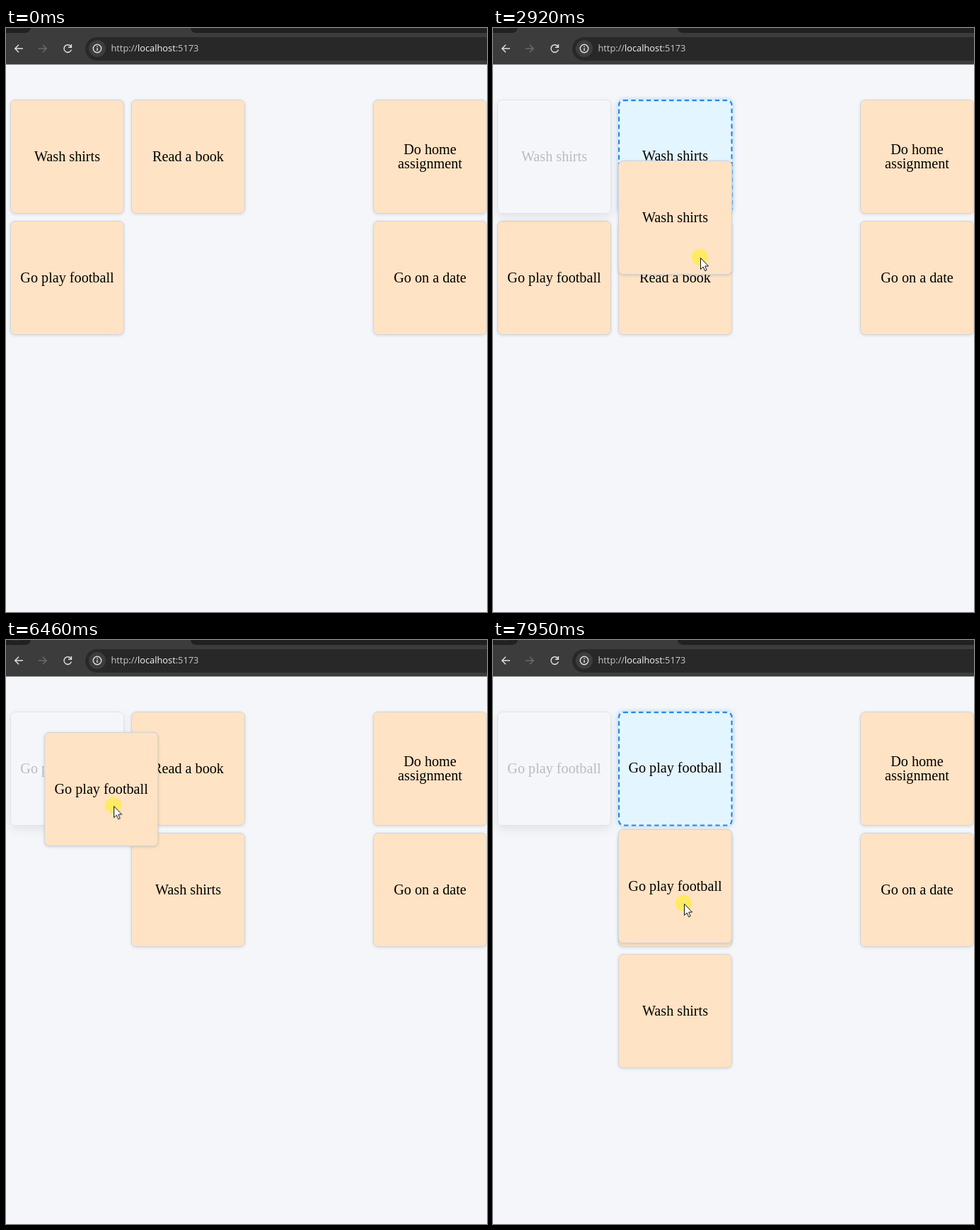
Recreate the animation shown at these times as an HTML page. Size 680 by 824 pixels, loop 8000 ms.

```html
<!DOCTYPE html>
<html lang="en">
<head>
<meta charset="utf-8">
<title>Task board</title>
<style>
  html, body { margin: 0; width: 100%; height: 100%; overflow: hidden; }
  body { position: relative; background: #f4f6fa; }
  body * { box-sizing: border-box; }

  /* Browser bar */
  .bar { position: absolute; left: 0; top: 0; width: 680px; height: 53px; }
  .url { font: 12.8px "Open Sans", "Noto Sans", sans-serif; fill: #c9c9c9; }
  .url .host { fill: #f4f4f4; }

  /* Cards */
  .card {
    position: absolute; left: 6px; top: 101px; width: 161px; height: 161px;
    display: flex; align-items: center; justify-content: center;
    padding-bottom: 2px;
    border: 1px solid #d3d6d9; border-radius: 7px;
    background: #ffe3c4; color: #000;
    box-shadow: 0 1px 4px rgba(0, 0, 0, .12);
    font: 20.2px/20px "Liberation Serif", "Times New Roman", serif;
    text-align: center; white-space: nowrap;
  }
  .col2 { left: 177px; }
  .col4 { left: 519px; }
  .row2 { top: 272px; }
  .ghost {
    background: transparent; color: #b9bcc0; border-color: #dfe2e7;
    box-shadow: 0 5px 14px rgba(0, 0, 0, .08);
  }
  /* Drawn at 150 px and enlarged, which also sets the dash length */
  .slot {
    left: 177px; width: 150.5px; height: 150.5px; font-size: 18.88px;
    scale: 1.07; transform-origin: 0 0;
    border: 2px dashed #2389e6; background: #e3f5ff;
    box-shadow: 0 0 6px rgba(35, 137, 230, .38);
  }
  .drag {
    left: 0; top: 0; border-color: #ced4da;
    box-shadow: 0 1px 4px rgba(0, 0, 0, .15);
  }

  /* Motion: one 8 s loop, hard changes by default */
  .card, .move, .cursor, .cursor * { animation: 8s step-end infinite; }
  .wash { animation-name: wash; }
  .football { animation-name: football; }
  .book { animation-name: book; }
  .first { animation-name: first; }
  .second { animation-name: second; }
  .first .slot { animation-name: slot1; }
  .second .slot { animation-name: slot2; }
  .first .drag { animation-name: drag1; animation-timing-function: linear; }
  .second .drag { animation-name: drag2; animation-timing-function: linear; }
  .cursor { animation-name: path; animation-timing-function: linear; }
  .arrow { animation-name: arrow; }
  .hand { animation-name: hand; }
  .halo { animation-name: halo; }

  /* Cards leave the stage while their ghost stands in */
  @keyframes wash {
    0% { translate: 0 0; }
    21.3% { translate: -400px 0; }
    61.65% { translate: 171px 171px; }
    84.1%, 100% { translate: 171px 342px; }
  }
  @keyframes football {
    0% { translate: 0 0; }
    61.65% { translate: 0 -171px; }
    77.5%, 100% { translate: -400px 0; }
  }
  @keyframes book {
    0% { translate: 0 0; }
    35.55% { translate: 0 171px; }
    43.55% { translate: 0 0; }
    84.1%, 100% { translate: 0 171px; }
  }
  @keyframes first {
    0% { visibility: hidden; }
    21.3% { visibility: visible; }
    61.65%, 100% { visibility: hidden; }
  }
  @keyframes second {
    0% { visibility: hidden; }
    77.5%, 100% { visibility: visible; }
  }
  @keyframes slot1 {
    0% { opacity: 0; translate: 0 171px; }
    28.8% { opacity: 1; translate: 0 171px; }
    35.55% { opacity: 1; translate: 0 0; }
    43.55%, 100% { opacity: 1; translate: 0 171px; }
  }
  @keyframes slot2 {
    0% { opacity: 0; }
    84.1%, 100% { opacity: 1; }
  }
  @keyframes drag1 {
    0%, 21.3% { translate: 8px 102px; }
    28% { translate: 93px 134px; }
    31.125% { translate: 177px 191px; }
    31.75% { translate: 177px 188px; }
    35.6%, 41.9% { translate: 177px 187px; }
    45.375%, 47.75% { translate: 186px 229px; }
    50.75%, 100% { translate: 184px 270px; }
  }
  @keyframes drag2 {
    0%, 77.5% { translate: 7px 102px; }
    80.75% { translate: 54px 130px; }
    87.25% { translate: 135px 161px; }
    88.125%, 91.25% { translate: 151px 169px; }
    92.1% { translate: 154px 172px; }
    99.375%, 100% { translate: 177px 267px; }
  }
  @keyframes path {
    0%, 1.3% { translate: 633px 796px; animation-timing-function: ease-out; }
    11.1% { translate: 158px 271px; }
    15% { translate: 118px 227px; }
    16.875%, 21.3% { translate: 129px 242px; }
    28% { translate: 216px 275px; }
    31.125% { translate: 293px 328px; }
    31.75% { translate: 293px 325px; }
    35.6%, 41.9% { translate: 293px 324px; }
    45.375%, 47.75% { translate: 309px 369px; }
    50.75%, 61.6% { translate: 307px 411px; }
    61.65%, 69.7% { translate: 305px 410px; }
    73.6% { translate: 100px 202px; }
    74.5%, 77.5% { translate: 104px 205px; }
    80.75% { translate: 152px 234px; }
    87.25% { translate: 231px 267px; }
    88.125%, 91.25% { translate: 246px 275px; }
    92.1% { translate: 249px 278px; }
    99.375%, 100% { translate: 270px 372px; }
  }
  @keyframes arrow {
    0% { opacity: 0; }
    1.3% { opacity: 1; }
    10.9% { opacity: 0; }
    21.3% { opacity: 1; }
    61.65% { opacity: 0; }
    72.2% { opacity: 1; }
    72.6% { opacity: 0; }
    77.5%, 100% { opacity: 1; }
  }
  @keyframes hand {
    0% { opacity: 0; }
    10.9% { opacity: 1; }
    21.3% { opacity: 0; }
    61.65% { opacity: 1; }
    72.2% { opacity: 0; }
    72.6% { opacity: 1; }
    77.5%, 100% { opacity: 0; }
  }
  @keyframes halo {
    0% { opacity: 0; }
    21.3% { opacity: 1; }
    61.65% { opacity: 0; }
    77.5%, 100% { opacity: 1; }
  }

  .cursor { position: absolute; left: 0; top: 0; width: 1px; height: 1px; overflow: visible; }
</style>
</head>
<body>
  <svg class="bar" viewBox="0 0 680 53" fill="none">
    <path d="M0 0H680V51.5H0Z" fill="#3c3c3c"/>
    <path d="M0 0H35Q34 7 26 7H0ZM261 0H680V7H269Q262 7 261 0Z" fill="#202121"/>
    <path d="M6 0H22" stroke="#3c3c3c"/>
    <rect x="112" y="13" width="600" height="33" rx="16.5" fill="#282828"/>
    <circle cx="129" cy="29" r="12" fill="#3d3d3d"/>
    <g stroke="#dedede" stroke-width="1.5">
      <path d="M24 29H13M18 23.8L12.8 29L18 34.2"/>
      <path d="M46 29H57M52 23.8L57.2 29L52 34.2" stroke="#716966"/>
      <path d="M91.8 26.2A5.3 5.3 0 1 0 92.4 30.6M92.4 23V27.3H88"/>
      <circle cx="129" cy="29" r="5.7"/>
      <path d="M129 28.3V32M129 25.6V27"/>
    </g>
    <text class="url" x="148.5" y="33.3">http://<tspan class="host">localhost</tspan>:5173</text>
  </svg>

  <div class="card wash">Wash shirts</div>
  <div class="card row2 football">Go play football</div>
  <div class="card col2 book">Read a book</div>
  <div class="card col4">Do home<br>assignment</div>
  <div class="card col4 row2">Go on a date</div>

  <div class="move first">
    <div class="card ghost">Wash shirts</div>
    <div class="card slot">Wash shirts</div>
    <div class="card drag">Wash shirts</div>
  </div>
  <div class="move second">
    <div class="card ghost">Go play football</div>
    <div class="card slot">Go play football</div>
    <div class="card drag">Go play football</div>
  </div>

  <svg class="cursor" fill="#fff" stroke-linejoin="round">
    <circle class="halo" cx="-.5" cy="-.7" r="11.7" fill="#ffec50" fill-opacity=".82"/>
    <path class="arrow" stroke="#111" d="M.5 .5V16.5L4.2 13L6.7 18.7L9.1 17.6L6.7 12H11.6Z"/>
    <path class="hand" stroke="#16273d" stroke-width="1.2" d="M-2 13.5V2.5C-2 .2 1.6 .2 1.6 2.5V8.5C1.6 7 4.6 7 4.6 9C4.6 7.8 7.4 8 7.4 10C7.4 8.9 9.8 9.2 9.8 11.5V15.5C9.8 18 8 19.5 8 22.3H-.5C-.5 20.5 -3 18.5 -5 16C-7 13.5 -7.3 12 -6 11.5C-4.5 11 -3 12.5 -2 13.5ZM1.6 8V12M4.6 9V12M7.4 10V12.5"/>
  </svg>
</body>
</html>
```
